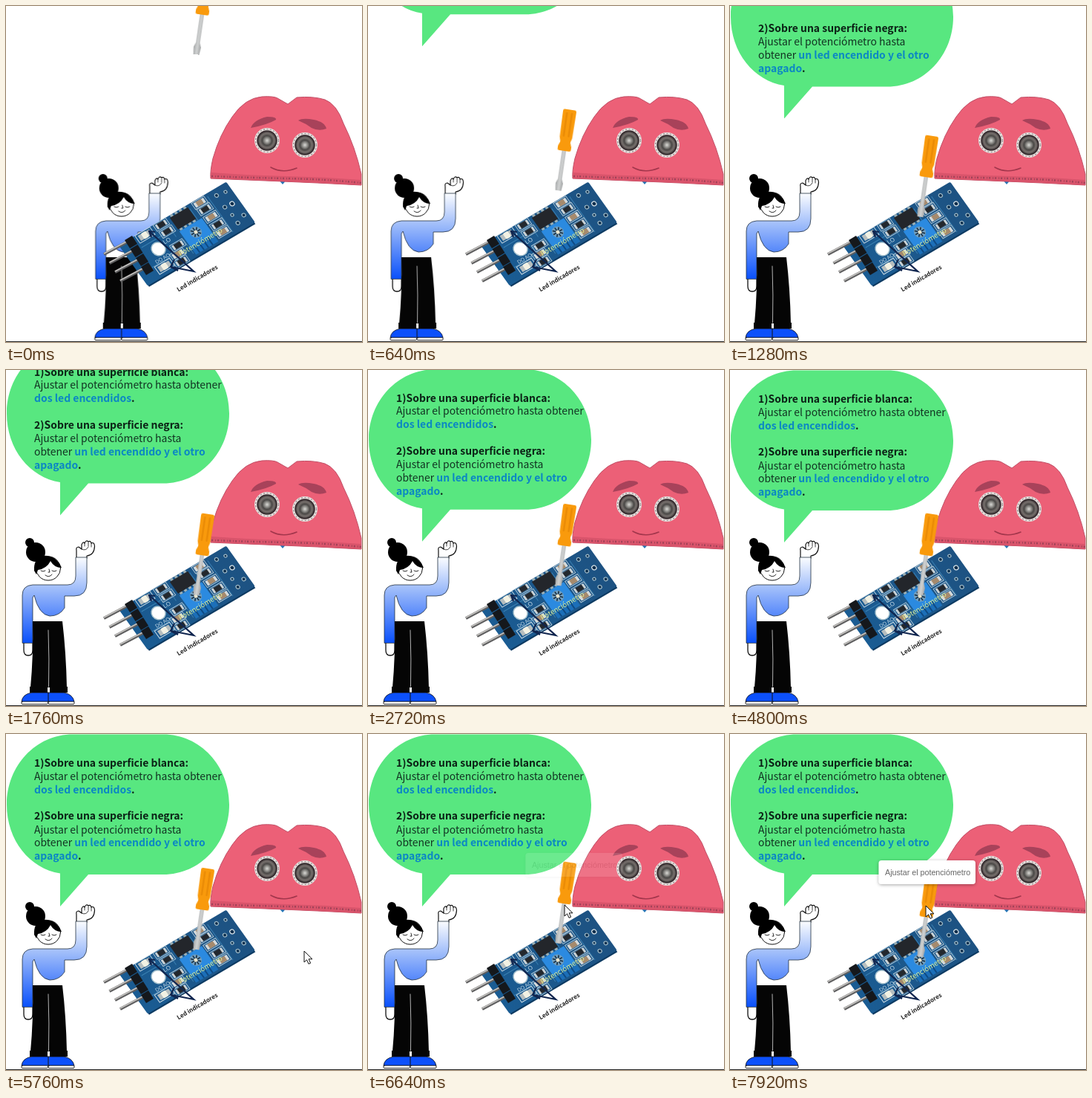
An HTML page for the animation above (8 s loop, 480 by 452 pixels).

```html
<!DOCTYPE html>
<html lang="es">
<head>
<meta charset="utf-8">
<title>Ajuste del sensor</title>
<style>
html, body { margin: 0; width: 100%; height: 100%; overflow: hidden; background: #fff; }
svg { display: block; width: 480px; height: 452px; }
.talk, .label { font-family: "Noto Sans CJK SC", "Noto Sans CJK JP", "Noto Sans", sans-serif; }
.talk { font-size: 13.95px; fill: #123322; }
.bold { font-weight: 700; fill: #0b2115; }
.blue { font-weight: 700; fill: #0b87c4; }
.tip-text { font: 10.7px "Liberation Sans", Arial, sans-serif; fill: #666; }

.person, .bubble, .entry, .cursor, .tooltip { animation: 8s infinite linear; }
.person { animation-name: walk; }
.bubble { animation-name: drop; }
.entry { animation-name: enter; }
.cursor { animation-name: point; }
.tooltip { animation-name: hint; }

@keyframes walk {
  0% { transform: translateX(99px); animation-timing-function: cubic-bezier(.33, .87, .67, 1); }
  13%, 100% { transform: none; }
}
@keyframes drop {
  0% { transform: translateY(-330px); animation-timing-function: cubic-bezier(.333, .867, .667, 1); }
  37.5%, 100% { transform: none; }
}
@keyframes enter {
  0% { transform: translateY(-223.500px); animation-timing-function: cubic-bezier(.33, .87, .67, 1); }
  15%, 100% { transform: none; }
}
@keyframes point {
  0%, 70% { transform: translate(486px, 330px); animation-timing-function: ease-out; }
  78%, 84% { transform: translate(265px, 230px); }
  88%, 100% { transform: translate(264px, 231px); }
}
@keyframes hint {
  0%, 82% { opacity: 0; transform: translate(12px, -10px); }
  83% { opacity: .12; transform: translate(12px, -10px); }
  87%, 100% { opacity: 1; transform: none; }
}
</style>
</head>
<body>
<svg viewBox="0 0 480 452">
  <defs>
    <linearGradient id="shirt" gradientUnits="userSpaceOnUse" x1="0" y1="250" x2="0" y2="366">
      <stop offset="0" stop-color="#fff"/>
      <stop offset=".4" stop-color="#9bbafa"/>
      <stop offset="1" stop-color="#0c52fb"/>
    </linearGradient>
    <linearGradient id="pcb" x1="0" x2="1">
      <stop offset="0" stop-color="#1a5c93"/>
      <stop offset="1" stop-color="#1d5282"/>
    </linearGradient>
    <linearGradient id="steel" x1="0" x2="1">
      <stop offset="0" stop-color="#a6a8a9"/>
      <stop offset=".5" stop-color="#d0d2d2"/>
      <stop offset="1" stop-color="#a2a4a5"/>
    </linearGradient>
    <radialGradient id="lens">
      <stop offset="0" stop-color="#dadad6"/>
      <stop offset=".25" stop-color="#94938f"/>
      <stop offset=".5" stop-color="#4a4846"/>
      <stop offset=".75" stop-color="#77706d"/>
      <stop offset="1" stop-color="#332c2e"/>
    </radialGradient>
    <filter id="shade" x="-10%" y="-30%" width="120%" height="170%">
      <feDropShadow dx="0" dy="1" stdDeviation="2" flood-opacity=".35"/>
    </filter>
    <g id="smd">
      <rect x="-10" y="-5" width="20" height="10" fill="none" stroke="#a9c3d3"/>
      <rect x="-8" y="-3.500" width="16" height="7" fill="#c9d2d6"/>
      <rect x="-5" y="-3.500" width="10" height="7" fill="#23282e"/>
    </g>
    <g id="cap">
      <rect x="-10" y="-5" width="20" height="10" fill="none" stroke="#a9c3d3"/>
      <rect x="-8" y="-3.500" width="16" height="7" fill="#d5dadb"/>
      <rect x="-4.500" y="-3.500" width="9" height="7" fill="#a58a6d"/>
    </g>
    <g id="led">
      <rect x="-12" y="-6" width="24" height="12" fill="none" stroke="#c5d7e2"/>
      <rect x="-9" y="-4" width="18" height="8" fill="#b6bebf"/>
      <rect x="-4" y="-4.500" width="8" height="9" rx="2" fill="#f2f1e3"/>
    </g>
    <g id="pin">
      <path d="M0 0 36 -19" stroke="#5e5e5f" stroke-width="4"/>
      <path d="M0 -1 34 -19" stroke="#c4c2bf" stroke-width="1.600"/>
      <path d="M28 -19 38 -25 45 -14 35 -8Z" fill="#15181c"/>
    </g>
    <g id="eye">
      <circle r="17" fill="#e6e0de"/>
      <circle r="15.500" fill="none" stroke="#97888a" stroke-width="1.200" stroke-dasharray="2 2.500"/>
      <circle r="13" fill="url(#lens)"/>
      <circle r="13" fill="none" stroke="#352a2d" stroke-width="1.500"/>
    </g>
  </defs>

  <rect width="480" height="452" fill="#fff"/>
  <path d="M0 451.500H480" stroke="#222"/>

  <g class="person" stroke-linejoin="round" stroke-linecap="round">
    <path d="M24 364V377Q24 384 30 384 36 384 36 377V364" fill="#fff" stroke="#111" stroke-width="1.300"/>
    <path d="M95 253V243Q94 238 98 238L102 241V235Q104 230 106 233 108 228 111 231 114 229 115 233 119 231 119.500 237 119 249 109 250V253Z" fill="#fff" stroke="#111" stroke-width="1.200"/>
    <path d="M102 241Q108 244 111 238M106 233V237M111 232V237M115 233V238" fill="none" stroke="#111" stroke-width=".800"/>
    <path d="M22 367V303Q22 290 36 289H83Q94 289 94 277V252H109V286Q109 304 92 304H79V320Q72 331 59 331 44 329 38 303L36 306V367Z" fill="url(#shirt)" stroke="#23303f" stroke-width=".800"/>
    <path d="M36 338H76Q81 380 82 427H33Q37 385 36 338Z" fill="#050505"/>
    <path d="M57 350Q58.500 390 57.500 426" fill="none" stroke="#ddd" stroke-width=".800"/>
    <path d="M32 426H56V434H32ZM59 426H83V434H59Z" fill="#050505"/>
    <path d="M21 446Q22 436 35 434H78Q90 436 92 446Z" fill="#0c50fb" stroke="#111" stroke-width=".800"/>
    <path d="M57 434V446" stroke="#111"/>
    <rect x="21" y="446" width="35.500" height="3.500" rx="1" fill="#fff" stroke="#111" stroke-width=".900"/>
    <rect x="57" y="446" width="35" height="3.500" rx="1" fill="#fff" stroke="#111" stroke-width=".900"/>

    <ellipse cx="57" cy="267" rx="16.500" ry="16" fill="#fff" stroke="#111"/>
    <circle cx="32" cy="232" r="6"/>
    <circle cx="40" cy="245" r="13"/>
    <path d="M38 270Q37 254 49 250 67 248 75 266 65 266 60 257 55 267 43 269L41 275Z"/>
    <path d="M47 270Q50 272 53 270M62 270Q65 272 68 270M58 268 59 272H57M53 276Q58 280 62 275" fill="none" stroke="#111" stroke-width=".900"/>
  </g>

  <g>
    <path d="M366 232H380L373 240Z" fill="#2476b8"/>
    <path d="M276 232Q275 222 279 205 288 173 305 149 322 124 345 122 361 121 366 124L380 132 392 123Q414 121 430 126 446 132 455 158 471 190 479 226V241L420 238 350 235Z" fill="#ec6077" stroke="#c04f66"/>
    <path d="M277 224Q330 228 380 229T479 234V241L420 238 350 235 276 232Z" fill="#d9546b"/>
    <path d="M277 229Q330 231 380 232T479 238" fill="none" stroke="#a04258" stroke-width="2.500" stroke-dasharray="2 3 1 2"/>
    <path d="M330 164Q334 153 352 149 365 149 364 153 352 160 330 164Z" fill="#a8425a"/>
    <path d="M394 154Q400 150 415 153 430 156 432 165 422 169 412 164 404 158 394 154Z" fill="#a8425a"/>
    <use href="#eye" x="352" y="181"/>
    <use href="#eye" x="403" y="187"/>
    <path d="M357 217Q373 226 392 218" fill="none" stroke="#a2364c" stroke-width="1.600" stroke-linecap="round"/>
  </g>

  <g transform="matrix(.838 -.494 .59 .826 152 322)">
    <path d="M1 65H172V68H1Z" fill="#0d3a62"/>
    <rect width="173" height="66" rx="2" fill="url(#pcb)"/>
    <path d="M24 18H72V29M54 38H78V60M110 6V60M140 4V62M20 48H52" fill="none" stroke="#397fb1"/>
    <g fill="#9bb0b7">
      <rect x="82" y="0" width="4" height="25"/><rect x="89" y="0" width="4" height="25"/>
      <rect x="96" y="0" width="4" height="25"/><rect x="103" y="0" width="4" height="25"/>
    </g>
    <rect x="80" y="3" width="29" height="19" fill="#23262b"/>
    <use href="#led" x="38" y="6"/>
    <use href="#led" x="35" y="55"/>
    <use href="#smd" x="65" y="5"/>
    <use href="#smd" x="66" y="17"/>
    <use href="#smd" x="67" y="40"/>
    <use href="#cap" x="60" y="50"/>
    <use href="#smd" x="58" y="61"/>
    <use href="#cap" x="126" y="6"/>
    <use href="#smd" x="127" y="17"/>
    <use href="#cap" x="128" y="30"/>
    <use href="#smd" x="129" y="43"/>
    <use href="#cap" x="129" y="55"/>
    <circle cx="42" cy="31" r="10" fill="#a9c4d0"/>
    <circle cx="42" cy="31" r="8.500" fill="#fff"/>
    <text x="53" y="30" font-family="Liberation Sans, sans-serif" font-size="8" fill="#c9deea">LO</text>
    <text x="28" y="47" font-family="Liberation Sans, sans-serif" font-size="7" fill="#c9deea">DO AO</text>
    <g transform="translate(0 3)">
      <rect x="80" y="24" width="36" height="36" fill="#1c6fb8"/>
      <path d="M86 48V60M93 48V60M100 48V60M107 48V60" stroke="#0f4a83" stroke-width="2"/>
      <rect x="80" y="22" width="36" height="26" fill="#2b8ae0"/>
      <circle cx="98" cy="34" r="8" fill="#6f9ec0"/>
      <path d="M91 34H105M98 27V41M93 29 103 39M103 29 93 39" stroke="#172b3c" stroke-width="1.500"/>
      <circle cx="98" cy="34" r="2.500" fill="#e7e4ce"/>
    </g>
    <g fill="#0c2e4d" stroke="#9fb9c6" stroke-width="1.200">
      <circle cx="151" cy="9" r="2.500"/><circle cx="164" cy="11" r="2"/>
      <circle cx="151" cy="28" r="2.500"/><circle cx="153" cy="42" r="2"/>
      <circle cx="153" cy="55" r="2.500"/><circle cx="166" cy="50" r="2.500"/>
      <circle cx="162" cy="29" r="3" stroke="#dfe8ec"/>
    </g>
  </g>
  <use href="#pin" x="132" y="334"/>
  <use href="#pin" x="139.500" y="346"/>
  <use href="#pin" x="147" y="358"/>
  <use href="#pin" x="154" y="370"/>

  <g fill="none" stroke="#10254f" stroke-width="2.200">
    <path d="M194 304 253 357 223 351"/>
    <path d="M201 304 193 303 196 311M227 341 222 351 232 356"/>
  </g>
  <text class="label" transform="translate(235 337) rotate(-30)" font-size="9.600" fill="#e0f39a">Potenciómetro</text>
  <text class="label" transform="translate(232.500 384.500) rotate(-30.500)" font-size="8" font-weight="700" fill="#222">Led indicadores</text>

  <g class="bubble">
    <path d="M90 .500H212C262 .500 301 43 301 95S262 189 212 189H111L73 232V187.500C32 181 1 143 1 95 1 43 40 .500 90 .500Z" fill="#58e780"/>
    <g class="talk" transform="translate(0 -.8)">
      <text class="bold" x="38" y="45">1)Sobre una superficie blanca:</text>
      <text x="38" y="62.500">Ajustar el potenciómetro hasta obtener</text>
      <text class="blue" x="38" y="80.500">dos led encendidos<tspan class="bold">.</tspan></text>
      <text class="bold" x="38" y="116">2)Sobre una superficie negra:</text>
      <text x="38" y="134.500">Ajustar el potenciómetro hasta</text>
      <text x="38" y="152">obtener <tspan class="blue">un led encendido y el otro</tspan></text>
      <text class="blue" x="38" y="170">apagado<tspan class="bold">.</tspan></text>
    </g>
  </g>

  <g class="entry">
    <g id="driver">
      <g transform="rotate(8.300)">
        <path d="M-2.700 -56H2.700V-16L5 -10 4 0H-4L-5 -10 -2.700 -16Z" fill="url(#steel)"/>
        <g transform="scale(1.13 1)">
          <path d="M-6 -110H6Q8 -110 8 -107L7.500 -72 6 -66 8 -60V-56Q8 -54 6 -54H-6Q-8 -54 -8 -56V-60L-6 -66 -7.500 -72 -8 -107Q-8 -110 -6 -110Z" fill="#f99a0c"/>
          <path d="M-3 -105V-74M3 -105V-74" stroke="#e88a06" stroke-width="2" stroke-linecap="round"/>
        </g>
      </g>
    </g>
  </g>

  <g class="tooltip">
    <rect x="200.500" y="170" width="130.500" height="32" rx="4" fill="#fff" filter="url(#shade)"/>
    <text class="tip-text" x="209" y="190">Ajustar el potenciómetro</text>
  </g>

  <path class="cursor" d="M0 0V15L3.600 11.800 6 17.300 8.600 16.200 6.200 10.800H11Z" fill="#fff" stroke="#111"/>
</svg>

<script>
const LOOP = 8000, PERIOD = 760, LOWEST = 1750;
const driver = document.getElementById('driver');
let start;

// The screwdriver bobs on a sine wave, restarting with each loop.
function bob(now) {
  start ??= now;
  const t = (now - start) % LOOP;
  const wave = Math.cos(2 * Math.PI * (t - LOWEST) / PERIOD);
  driver.setAttribute('transform', `translate(256.500 ${291.7 + 11 * wave})`);
  requestAnimationFrame(bob);
}
requestAnimationFrame(bob);
</script>
</body>
</html>
```
